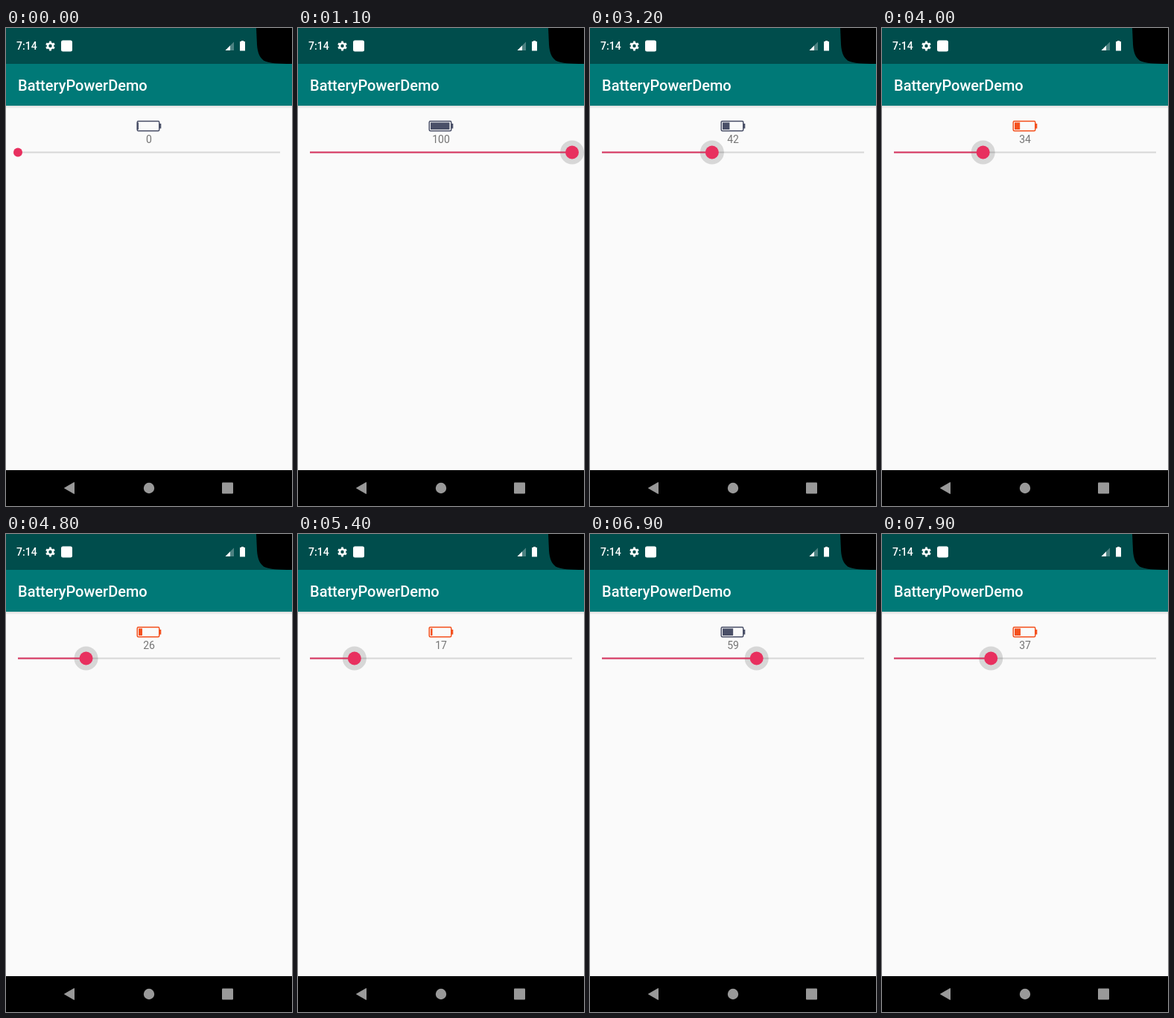
These frames come from a looping animation (384x640 px, 8000 ms). An HTML page:

```html
<!DOCTYPE html>
<html lang="en">
<head>
<meta charset="utf-8">
<style>
  html, body { margin: 0; width: 100%; height: 100%; overflow: hidden; background: #fafafa; }
  svg { display: block; width: 100vw; height: 100vh; font-family: Roboto, sans-serif; }
</style>
</head>
<body>
<svg viewBox="0 0 384 640">
  <defs>
    <linearGradient id="shadow" x2="0" y2="1">
      <stop stop-color="#000" stop-opacity=".13"/>
      <stop offset="1" stop-color="#000" stop-opacity="0"/>
    </linearGradient>
  </defs>
  <rect width="384" height="640" fill="#fafafa"/>
  <rect y="104" width="384" height="4" fill="url(#shadow)"/>
  <rect y="48" width="384" height="56" fill="#007977"/>
  <rect width="384" height="48" fill="#004d4c"/>
  <path d="M336 0L337 22Q338 40 348 44.500Q356 48 384 48V0Z"/>

  <!-- status bar -->
  <g fill="#fff" font-weight="500">
    <text x="14" y="29" font-size="14">7:14</text>
    <text x="16" y="84" font-size="20">BatteryPowerDemo</text>
    <g fill="none" stroke="#fff">
      <circle cx="59.500" cy="24" r="3.500" stroke-width="2.600"/>
      <circle cx="59.500" cy="24" r="5.300" stroke-width="2.200" pathLength="12" stroke-dasharray="1" stroke-dashoffset="-.5"/>
    </g>
    <rect x="74" y="16.500" width="15" height="15" rx="2.500"/>
    <path d="M306 18.500V30H294.500Z" opacity=".3"/>
    <path d="M301 23.500V30H294.500Z"/>
    <path d="M316 18V17H319V18H320.500Q321 18 321 18.500V30.500H314V18.500Q314 18 314.500 18Z"/>
  </g>

  <!-- battery, its level and the slider -->
  <g id="battery">
    <rect x="176.250" y="124.700" width="29.500" height="13" rx="1.500" fill="none" stroke="currentColor" stroke-width="1.500"/>
    <rect x="206" y="128" width="2.300" height="6.500" fill="currentColor"/>
    <rect id="charge" y="126.500" height="9.500" fill="currentColor"/>
  </g>
  <text id="level" x="192" y="153.500" font-size="14" text-anchor="middle" fill="#757575"></text>
  <circle id="halo" cy="166.500" fill="#000" fill-opacity=".14"/>
  <rect x="16" y="165.500" width="352" height="2" fill="#000" fill-opacity=".14"/>
  <rect id="progress" x="16" y="165.500" height="2" fill="#d9325f"/>
  <circle id="thumb" cy="166.500" fill="#e8305f"/>

  <!-- navigation bar -->
  <rect y="592" width="384" height="48"/>
  <g fill="#999">
    <path d="M78.500 616L91.500 608.500V623.500Z" stroke="#999" stroke-linejoin="round"/>
    <circle cx="192" cy="616" r="7.200"/>
    <rect x="290" y="608.500" width="15" height="15" rx="1"/>
  </g>
</svg>
<script>
  const LOOP = 8000, STEP = 100, PRESS = 100;
  // [time in ms, level in percent]
  const drag = [
    [0, 0], [100, 0], [900, 90], [1050, 100], [1800, 100], [2000, 73],
    [2400, 60], [3200, 42], [4800, 26], [6000, 8], [6200, 0], [6350, 0],
    [6900, 59], [7200, 97], [7300, 100], [7400, 100], [7900, 37]
  ];
  const el = id => document.getElementById(id);
  const set = (id, attrs) => {
    for (const name in attrs) el(id).setAttribute(name, attrs[name]);
  };

  function levelAt(t) {
    const i = drag.findIndex(([time]) => time >= t);
    if (i < 1) return drag[0][1];
    const [t0, v0] = drag[i - 1], [t1, v1] = drag[i];
    return Math.round(v0 + (v1 - v0) * (t - t0) / (t1 - t0));
  }

  function render(t) {
    const level = levelAt(t), x = 16 + 3.52 * level;
    const press = Math.max(0, Math.min(1, (t - PRESS) / 200));
    const chargeEnd = 175.8 + 0.277 * level;
    el("battery").style.color = t >= PRESS && level < 40 ? "#f4511e" : "#4a5068";
    set("charge", { x: Math.min(178, chargeEnd), width: Math.abs(chargeEnd - 178) });
    el("level").textContent = level;
    set("progress", { width: x - 16 });
    set("halo", { cx: x, r: 16 * press });
    set("thumb", { cx: x, r: 6 + 3 * press });
  }

  const start = performance.now();
  function tick() {
    const t = (performance.now() - start) % LOOP;
    render(Math.floor(t / STEP) * STEP);
    requestAnimationFrame(tick);
  }
  tick();
</script>
</body>
</html>
```
